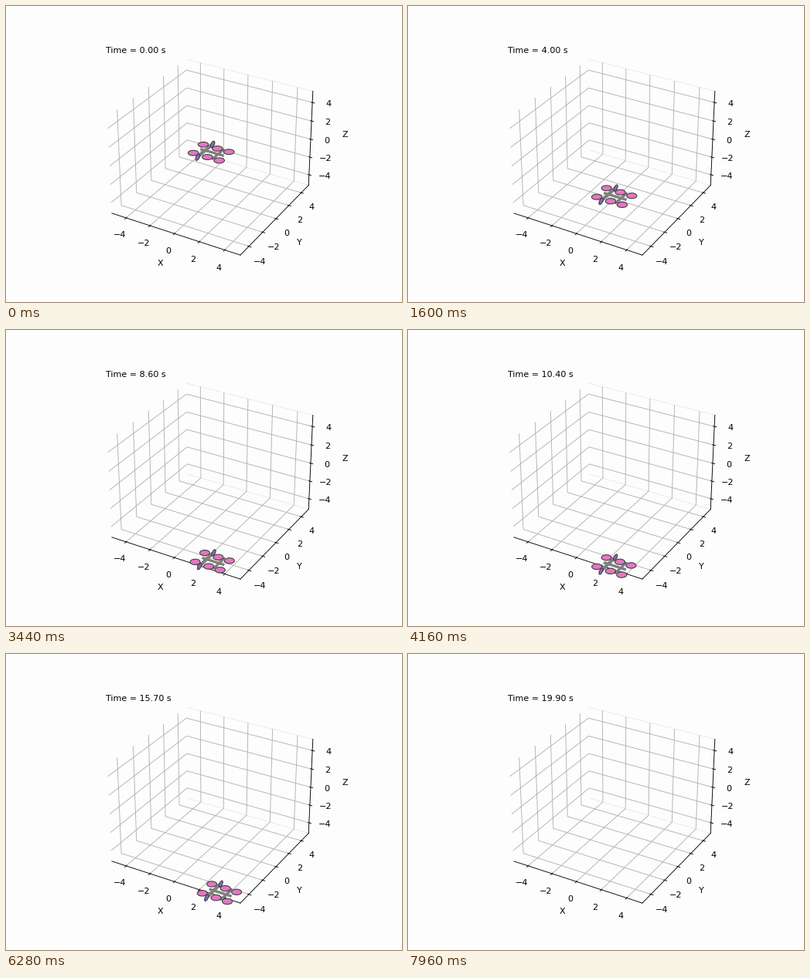
Animation of 512 by 384 pixels, one loop 8 s. Source, as a matplotlib script:

```python
import numpy as np
import matplotlib.pyplot as plt
from matplotlib.animation import FuncAnimation
from mpl_toolkits.mplot3d.art3d import Poly3DCollection

FRAMES, INTERVAL, DT = 200, 40, 0.1
PAPER, PINK, PURPLE, GRAY, DARK = "#fdfdfd", "#e377c2", "#9467bd", "#7f7f7f", "#404040"

# Dive: underdamped step response after a short thruster lag
DIVE_DEPTH, DAMPING, OMEGA, LAG = 10.05, 0.27, 0.25, 0.15
SWAY_TIME = 13
SURGE_START, SURGE_RATE, CLIMB = 15, 1.46, 0.07


def position(t):
    s = max(t - LAG, 0)
    ring = np.cos(OMEGA * s) + DAMPING / OMEGA * np.sin(OMEGA * s)
    depth = DIVE_DEPTH * (1 - np.exp(-DAMPING * s) * ring)
    sway = 0.11 * np.sin(np.pi * min(t / SWAY_TIME, 1))
    surge = SURGE_RATE * max(t - SURGE_START, 0) ** 2.05
    return np.array([sway + surge, 0, CLIMB * surge - depth])


def disc(center, radius, axes):
    """Circle lying in the plane of the two given axes."""
    a = np.linspace(0, 2 * np.pi, 40, endpoint=False)
    pts = np.tile(np.array(center, float), (len(a), 1))
    pts[:, axes[0]] += radius * np.cos(a)
    pts[:, axes[1]] += radius * np.sin(a)
    return pts


def crossbar(x, half):
    return np.array([(x, -half, 0), (x, half, 0)])


lifters = [disc((x, y, 0), 0.37, (0, 1)) for x in (-1.16, 0, 0.95) for y in (0.7, -0.7)]
pushers = [disc((-0.59, y, 0), 0.3, (1, 2)) for y in (1.05, -1.05)]
bars = [
    (crossbar(0.5, 0.87), DARK, 1.4),
    (np.array([(-0.95, 0, 0), (0.95, 0, 0)]), GRAY, 3),
    (crossbar(-0.56, 0.95), GRAY, 4),
    (crossbar(0.5, 0.7), GRAY, 3),
]

fig = plt.figure(figsize=(6.4, 4.8), dpi=80, facecolor=PAPER)
ax = fig.add_subplot(projection="3d", facecolor=PAPER)
lim = 5 * 25 / 24
ax.set(xlim=(-lim, lim), ylim=(-lim, lim), zlim=(-lim, lim),
       xlabel="X", ylabel="Y", zlabel="Z")
for axis, edge in ((ax.xaxis, "none"), (ax.yaxis, "0.93"), (ax.zaxis, "none")):
    axis.pane.set_alpha(None)
    axis.pane.set_fill(False)
    axis.pane.set_edgecolor(edge)

clock = ax.text2D(0.05, 0.95, "", transform=ax.transAxes)
lines = [ax.plot([0, 0], [0, 0], [0, 0], color=c, lw=w, solid_capstyle="butt")[0]
         for _, c, w in bars]
rotors = [Poly3DCollection([d], facecolors=c, edgecolors=DARK, linewidths=1)
          for group, c in ((pushers, PURPLE), (lifters, PINK)) for d in group]
for rotor in rotors:
    ax.add_collection3d(rotor)


def draw(i):
    t = i * DT
    pos = position(t)
    clock.set_text(f"Time = {t:.2f} s")
    for line, (ends, _, _) in zip(lines, bars):
        line.set_data_3d(*(ends + pos).T)
    for rotor, shape in zip(rotors, pushers + lifters):
        rotor.set_verts([shape + pos])
    return [clock, *lines, *rotors]


anim = FuncAnimation(fig, draw, frames=FRAMES, init_func=lambda: draw(0),
                     interval=INTERVAL, repeat=True, repeat_delay=0)
plt.show()
```
